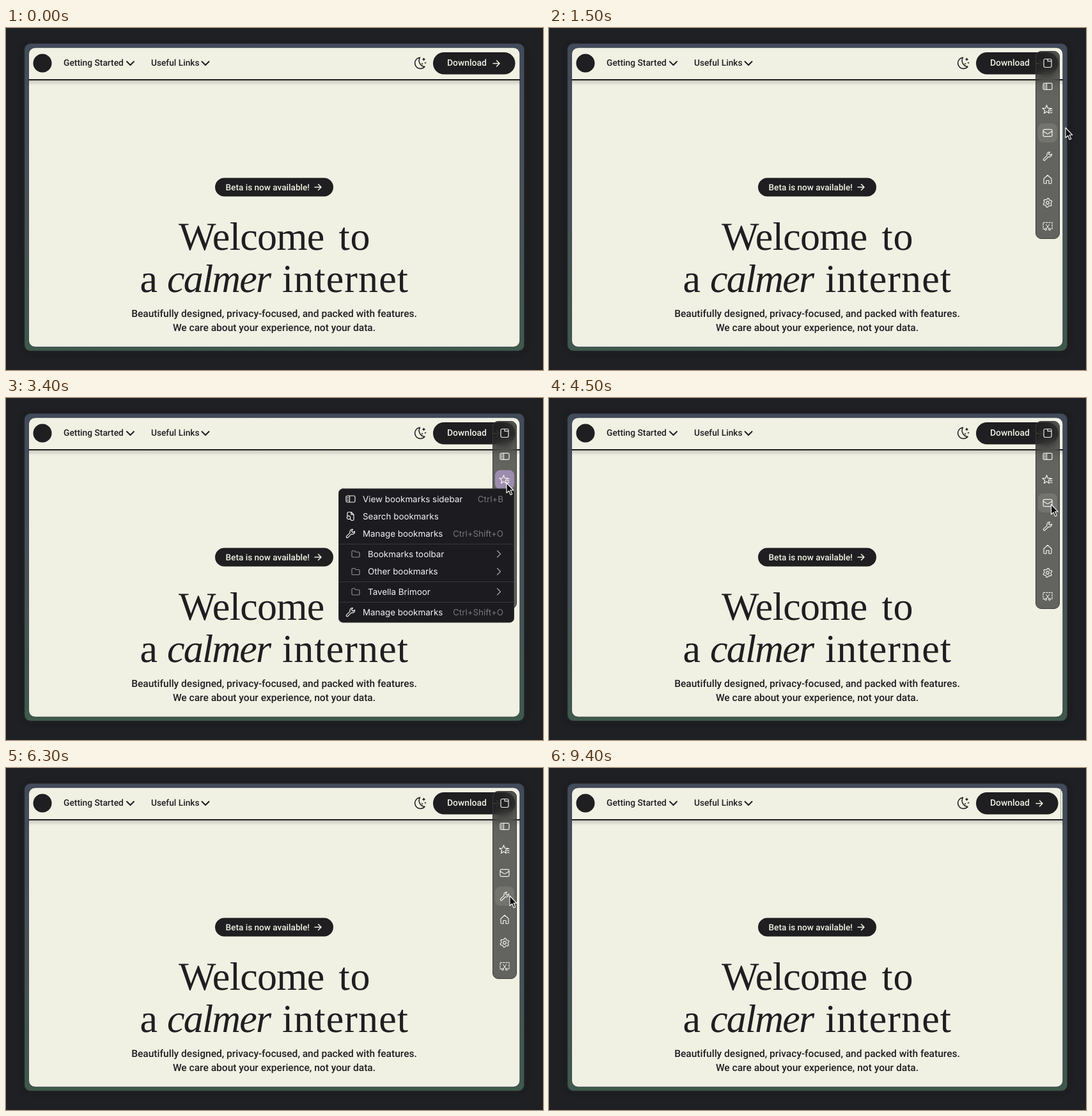
Animation, 840 px wide and 535 px high, one loop 9500 ms. Source, as an HTML page:

```html
<!DOCTYPE html>
<html lang="en">
<head>
<meta charset="utf-8">
<title>Compact toolbar</title>
<style>
html, body { margin: 0; width: 100%; height: 100%; overflow: hidden; background: #1f2023; }
svg { position: absolute; left: 0; top: 0; overflow: visible; fill: none; stroke-linecap: round; stroke-linejoin: round; }
text { stroke: none; white-space: pre; text-rendering: geometricPrecision; }
#page { font-family: Roboto, sans-serif; font-weight: 500; }
#page .serif { font: 400 62px "Liberation Serif", serif; }
#page .slant { font-style: italic; }
.menu { font: 400 13.4px Inter, sans-serif; }
#window { position: absolute; left: 29px; top: 24px; width: 782px; height: 481px; border-radius: 9px; overflow: hidden; }
#bar { position: absolute; left: 732px; top: 11.5px; width: 36px; height: 292px; border: 1px solid #3c3c3b; border-radius: 9px;
  background: rgba(27, 27, 27, .66); backdrop-filter: blur(9px); }
</style>
</head>
<body>
<svg id="page" width="840" height="535"></svg>
<div id="window"><div id="bar"><svg id="tools" width="36" height="292"></svg></div></div>
<svg id="top" width="840" height="535"></svg>
<script>
const $ = id => document.getElementById(id);
const ink = '#1f1e21', paper = '#f0f0e3';

const line = (d, color, width = 1.2, extra = '') => `<path d="${d}" stroke="${color}" stroke-width="${width}" ${extra}/>`;
const text = (x, y, s, size, fill = ink, extra = '') => `<text x="${x}" y="${y}" font-size="${size}" fill="${fill}" ${extra}>${s}</text>`;
const box = (x, y, w, h, r, fill, extra = '') => `<rect x="${x}" y="${y}" width="${w}" height="${h}" rx="${r}" fill="${fill}" ${extra}/>`;
const serif = (x, y, s, gap, style = '') => `<text class="serif ${style}" x="${x}" y="${y}" fill="${ink}" letter-spacing="${gap}">${s}</text>`;
const arrow = (x, y) => line(`M${x - 5} ${y}h10m-4.5-4.5 4.5 4.5-4.5 4.5`, paper, 1.5);
const chevron = x => line(`M${x} 52.5l5.5 5.5 5.5-5.5`, ink, 2);

// Closed outline through n points, the radius given per point
const polar = (n, radius, cx = 0, cy = 0) => 'M' + Array.from({ length: n }, (_, i) => {
  const a = i / n * 2 * Math.PI - Math.PI / 2, r = radius(i);
  return `${(cx + r * Math.cos(a)).toFixed(2)} ${(cy + r * Math.sin(a)).toFixed(2)}`;
}).join('L') + 'Z';
const spark = (x, y, r) => `<path d="${polar(8, i => i % 2 ? r * .45 : r, x, y)}" fill="${ink}"/>`;

const rounded = (w, h) => `M${2 - w} ${-h}H${w - 2}a2 2 0 0 1 2 2V${h - 2}a2 2 0 0 1-2 2H${2 - w}a2 2 0 0 1-2-2V${2 - h}a2 2 0 0 1 2-2Z`;
const circle = (x, y, r) => `M${x - r} ${y}a${r} ${r} 0 1 0 ${2 * r} 0a${r} ${r} 0 1 0 ${-2 * r} 0`;
const icons = {
  tab: rounded(6, 6.5) + 'M0-6.5V-3.2H6',
  sidebar: rounded(7, 5) + 'M-1.5-5V5M-5-2.5h1.5M-5 0h1.5M-5 2.5h1.5',
  star: polar(10, i => i % 2 ? 3 : 7, -1.5, 0) + 'M3.5-1.5H7M3.8 1.5H7M4.5 4.5H7',
  mail: rounded(7, 5.5) + 'M-6.5-2.5L-1 1Q0 1.6 1 1L6.5-2.5',
  wrench: 'M6.5-3.5L3.7-1.5 1.5-3.7 3.5-6.5C.5-7.2-2-4.2-.9-1.2L-6.3 4.2C-7.4 5.8-5.8 7.4-4.2 6.3L1.2.9C4.2 2 7.2-.5 6.5-3.5Z',
  home: 'M-6-1.2L0-6.8 6-1.2V5a1.5 1.5 0 0 1-1.5 1.5H2V1.5H-2V6.5H-4.5A1.5 1.5 0 0 1-6 5Z',
  gear: polar(24, i => i % 4 < 2 ? 7 : 5.3) + circle(0, 0, 2.2),
  search: 'M-5 0V-5a1.5 1.5 0 0 1 1.5-1.5H1L5-2.5V5a1.5 1.5 0 0 1-1.5 1.5H2M1-6.5V-2.5H5' + circle(-3, 2, 2.7) + 'M-1 4L1.5 6.5',
  folder: 'M-6-3.5A1.5 1.5 0 0 1-4.5-5H-1.5L0-3H4.5A1.5 1.5 0 0 1 6-1.5V3.5A1.5 1.5 0 0 1 4.5 5H-4.5A1.5 1.5 0 0 1-6 3.5Z',
  gauge: circle(0, 0, 6.3) + circle(0, 0, 3.2) + 'M-1 1L3-3M0 1.3h.1',
  chevron: 'M-2.5-5L2.5 0-2.5 5',
  scissors: 'M-2.5-2.5L2 4M2.5-2.5L-2 4' + circle(-3, 5.2, 1.5) + circle(3, 5.2, 1.5)
};
const icon = (name, x, y, color = '#f0f0ee') => `<g transform="translate(${x} ${y})">${line(icons[name], color, 1.2)}</g>`;

$('page').innerHTML = `
  <defs>
    <linearGradient id="frame" x2="0" y2="1"><stop stop-color="#424b5b"/><stop offset=".55" stop-color="#475156"/><stop offset="1" stop-color="#3e5a4b"/></linearGradient>
    <linearGradient id="shade" x2="0" y2="1"><stop stop-color="#000" stop-opacity=".16"/><stop offset="1" stop-color="#000" stop-opacity="0"/></linearGradient>
    <filter id="blur"><feGaussianBlur stdDeviation="5"/></filter>
  </defs>`
  + box(28, 25, 784, 482, 10, '#121316', 'filter="url(#blur)" opacity=".5"')
  + box(29, 24.5, 781.5, 480.5, 9, 'url(#frame)', 'stroke="#34393e" stroke-width=".8"')
  + box(35.5, 30.7, 768.3, 468.3, 10, paper, 'stroke="#2b3240" stroke-width=".8"')
  + box(36, 82, 768, 8, 0, 'url(#shade)') + box(35.5, 80, 768.5, 2, 0, ink)
  + `<circle cx="57" cy="55" r="14.5" fill="${ink}"/>`
  + text(90, 59, 'Getting Started', 13.8) + chevron(189)
  + text(227, 59, 'Useful Links', 13.7) + chevron(306.5)
  + line('M647.5 46.2A8.7 8.7 0 1 0 655 60.5A9.5 9.5 0 0 1 647.5 46.2Z', ink, 1.5)
  + spark(653.5, 49, 2.8) + spark(651, 56, 1.8) + spark(656, 54.5, 1.8)
  + box(668, 38, 128.5, 34.5, 17.2, ink) + text(690, 59, 'Download', 13.9, paper) + arrow(767, 55.5)
  + box(327, 234.5, 185, 29, 14.5, ink) + text(343.5, 253.5, 'Beta is now available!', 13.6, paper) + arrow(488, 249)
  + serif(270, 347, 'Welcome', -.7) + serif(520.5, 347, 'to', .8)
  + serif(209.5, 413, 'a', 0) + serif(252, 413, 'calmer', -1.8, 'slant') + serif(432, 413, 'internet', 1.1)
  + text(419.5, 452, 'Beautifully designed, privacy-focused, and packed with features.', 15.55, ink, 'text-anchor="middle"')
  + text(419.5, 474, 'We care about your experience, not your data.', 15.55, ink, 'text-anchor="middle"')
  + box(800, 32, 1, 48, 0, '#8d8e88', 'id="sliver"');

const rowY = i => 18 + 36.4 * i;
$('tools').innerHTML = box(3, 0, 30, 30, 8, '#fff', 'id="hover"')
  + ['tab', 'sidebar', 'star', 'mail', 'wrench', 'home', 'gear'].map((name, i) => icon(name, 18, rowY(i))).join('')
  + `<g transform="translate(18 ${rowY(7)})">`
  + line('M-5 4.5H-7V-5.5H7V4.5H5', '#f0f0ee', 1.2, 'stroke-dasharray="2.2 2"') + line(icons.scissors, '#f0f0ee', 1) + '</g>';

// Row: [centre y, label, shortcut, icon]
const row = (x, right, [y, label, keys, name], iconX, tint) =>
  text(x, y + 4.9, label, 13.4, '#f4f3f5') + (name ? icon(name, iconX, y, tint) : '')
  + (keys ? text(right, y + 4.9, keys, 13.4, '#77767a', 'text-anchor="end"') : '');
const panel = (x, y, w, h) => box(x + .5, y + .5, w - 1, h - 1, 6.5, '#1c1b1f', 'stroke="#343338"');

const bookmarks = panel(520, 141.5, 275, 210)
  + [[158, 'View bookmarks sidebar', 'Ctrl+B', 'sidebar'], [185, 'Search bookmarks', '', 'search'],
    [212, 'Manage bookmarks', 'Ctrl+Shift+O', 'wrench'], [335, 'Manage bookmarks', 'Ctrl+Shift+O', 'wrench']]
    .map(r => row(558, 778, r, 539)).join('')
  + [[244, 'Bookmarks toolbar'], [271.5, 'Other bookmarks'], [303, 'Tavella Brimoor']]
    .map(([y, s]) => row(566, 778, [y, s, '', 'folder'], 547, '#929195') + icon('chevron', 771, y, '#a5a4a8')).join('')
  + [228, 287, 319].map(y => box(521, y, 273, 1, 0, '#38373b')).join('');

const developer = panel(482, 211, 316, 322)
  + [['Web Developer Tools', 'Ctrl+Shift+I'], ['Task Manager', 'Shift+Esc', 'gauge'], ['Remote Debugging'],
    ['Browser Toolbox', 'Ctrl+Shift+Alt+I'], ['Browser Console', 'Ctrl+Shift+J'], ['Responsive Design Mode', 'Ctrl+Shift+M'],
    ['Eyedropper'], ['Page Source', 'Ctrl+U'], ['Extensions for developers']]
    .map((r, i) => row(526, 780, [231.5 + 35.2 * i, ...r], 506)).join('');

$('top').innerHTML = `<g class="menu" id="bookmarks">${bookmarks}</g><g class="menu" id="developer">${developer}</g>
  <path id="cursor" d="M0 0V15.5L3.6 12.3 6.2 18.5 8.7 17.4 6.1 11.3H10.8Z" fill="#0c0c0d" stroke="#fff" stroke-width="1.1"/>`;

const clamp = v => Math.min(1, Math.max(0, v));
const ramp = (t, start, span) => clamp((t - start) / span);
const smooth = p => p * p * (3 - 2 * p);

// Pointer stops: [time, x, y]
const route = [[100, 620, 280], [600, 808, 156], [1500, 808, 156], [2300, 783, 137],
  [2500, 783, 137], [2700, 783, 133], [4200, 783, 133], [4800, 788, 200], [7300, 788, 200], [7900, 620, 280]];
function pointer(t) {
  let i = 0;
  while (i < route.length - 2 && t > route[i + 1][0]) i++;
  const [a, x, y] = route[i], [b, u, v] = route[i + 1], p = smooth(ramp(t, a, b - a));
  return [x + (u - x) * p, y + (v - y) * p];
}

function draw(t) {
  const [x, y] = pointer(t);
  $('cursor').setAttribute('transform', `translate(${x} ${y})`);
  $('cursor').style.opacity = t >= 100 && t < 8100 ? 1 : 0;

  const shown = t < 4000 ? 1 - (1 - ramp(t, 600, 260)) ** 3 : 1 - ramp(t, 7700, 350) ** 2;
  $('bar').style.transform = `translateX(${52 * (1 - shown)}px)`;
  $('bar').style.visibility = shown ? 'visible' : 'hidden';
  $('sliver').style.opacity = t >= 8500 ? .6 : 0;

  const first = ramp(t, 2450, 200) * (1 - ramp(t, 3500, 200));
  const second = ramp(t, 4850, 200) * (1 - ramp(t, 5800, 200));
  for (const [id, p] of [['bookmarks', first], ['developer', second]]) {
    $(id).style.opacity = p;
    $(id).setAttribute('transform', `translate(0 ${-4 * (1 - p)})`);
  }
  const hover = $('hover'), open = first + second > 0;
  hover.setAttribute('y', rowY(Math.round((y - 54.5) / 36.4)) - 15);
  hover.setAttribute('fill', open ? '#9c8cad' : '#fff');
  hover.style.opacity = x < 761 ? 0 : open ? 1 : .1;
}

// The picture advances ten times a second
function tick() {
  draw(Math.floor(performance.now() % 9500 / 100) * 100);
  requestAnimationFrame(tick);
}
tick();
</script>
</body>
</html>
```
